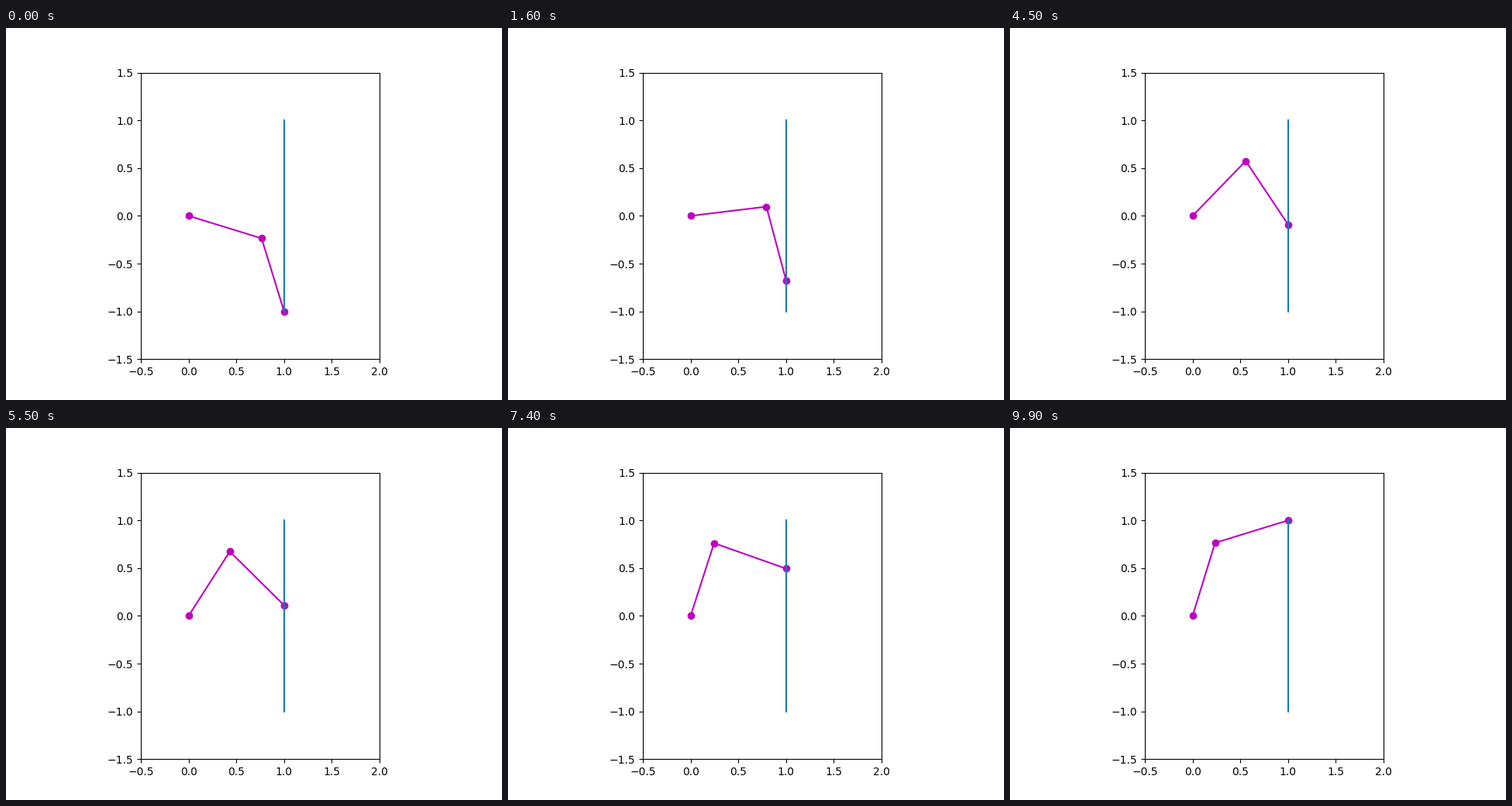
Recreate the animation shown at these times as a matplotlib script. Size 640x480 px, loop 10 s.

```python
import matplotlib.pyplot as plt
import numpy as np
from matplotlib.animation import FuncAnimation

FRAMES = 100
LINK = 0.8  # length of both arm segments

heights = np.linspace(-1, 1, FRAMES)


def elbow(x, y):
    """Upper joint position for an arm reaching from the origin to (x, y)."""
    reach = np.hypot(x, y)
    rise = np.sqrt(LINK**2 - (reach / 2) ** 2) / reach
    return x / 2 - y * rise, y / 2 + x * rise


fig, ax = plt.subplots(figsize=(6.4, 4.8), dpi=100)
ax.set_aspect("equal")
ax.set_xlim(-0.5, 2)
ax.set_ylim(-1.5, 1.5)

arm, = ax.plot([], [], "o-", color="m")
ax.plot(np.ones(FRAMES), heights, color="C0")


def update(i):
    tip = 1, heights[i]
    joint = elbow(*tip)
    arm.set_data([0, joint[0], tip[0]], [0, joint[1], tip[1]])
    return arm,


anim = FuncAnimation(fig, update, frames=FRAMES, interval=100,
                     repeat=True, repeat_delay=0, blit=False)

plt.show()
```
